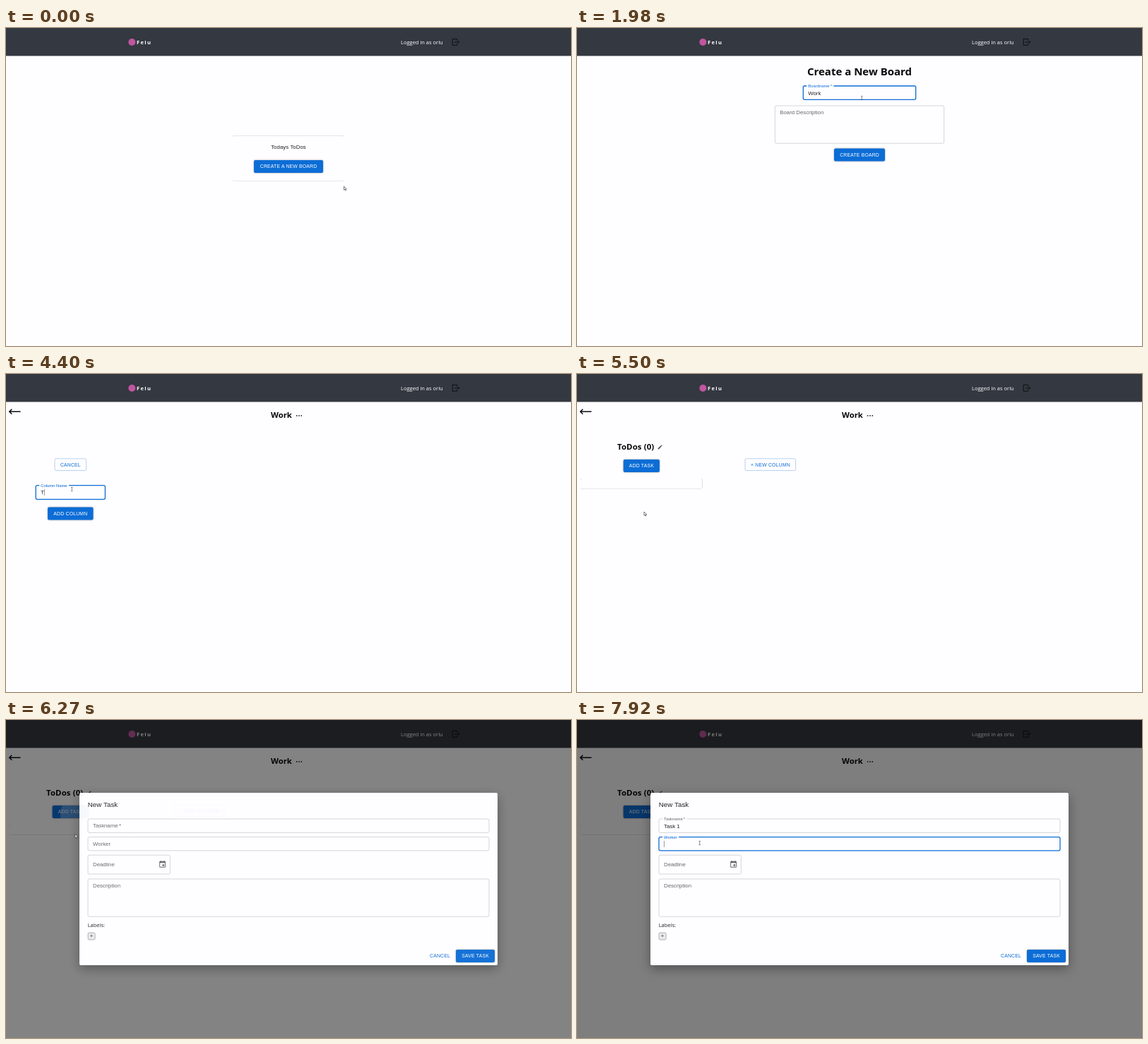
An HTML page for the animation above (8 s loop, 800 px wide and 450 px high).

```html
<!DOCTYPE html>
<html lang="en">
<head>
<meta charset="utf-8">
<title>Board demo</title>
<style>
  html, body { margin: 0; width: 100%; height: 100%; overflow: hidden; background: #fefdff; }
  #stage { display: block; width: 800px; height: 450px; }
  text { font: 7.8px "Liberation Sans", Arial, sans-serif; fill: #222; white-space: pre; }
  .ui { font: 7.5px "Open Sans", "Noto Sans", sans-serif; }
  .bold { font-weight: 700; fill: #080808; }
  .mid { text-anchor: middle; }
  .cap { font-size: 6.85px; letter-spacing: .0286em; text-anchor: middle; fill: #fff; }
  .blue { fill: #0c6dd6; }
  .paper { fill: #fefdff; filter: drop-shadow(0 .7px .6px rgba(0, 0, 0, .5)); }
  .btn .face { fill: #0c6dd6; filter: drop-shadow(0 .9px .8px rgba(0, 0, 0, .38)); }
  .btn.hover .face { fill: #1260bd; filter: drop-shadow(0 1.2px 1.5px rgba(0, 0, 0, .5)); }
  .ripple { fill: #fff; opacity: 0; }
  .outline { fill: #fefdff; stroke: #86b6ea; stroke-width: .6; }
  .frame { fill: none; stroke: #c4c3c6; stroke-width: .7; }
  .label { fill: #666; }
  .focus .frame { stroke: #0c6dd6; stroke-width: 1.3; }
  .focus .label { fill: #0c6dd6; }
  .notch { fill: #fefdff; }
  .caret { stroke: #333; stroke-width: .5; }
  .line { fill: none; stroke: #0b0c0e; }
  #sheet { fill: #fefdff; filter: drop-shadow(0 5px 8px rgba(0, 0, 0, .35)); }
  #cursor path { fill: #fff; stroke: #222; stroke-width: .6; stroke-linejoin: round; }
  #cursor #beam { fill: none; stroke: #444; }
</style>
</head>
<body>
<svg id="stage" viewBox="0 0 800 450"></svg>
<script>
const LOOP = 8000, STEP = 110;
const $ = id => document.getElementById(id);
const clamp = v => Math.max(0, Math.min(1, v));

// Markup helpers
const text = (x, y, s, cls = '', style = '') =>
  `<text x="${x}" y="${y}" class="${cls}" style="${style}">${s}</text>`;
const rect = (x, y, w, h, cls, rx = 2) =>
  `<rect x="${x}" y="${y}" width="${w}" height="${h}" rx="${rx}" class="${cls}"/>`;
const group = (id, body, attrs = '') => `<g id="${id}" ${attrs}>${body}</g>`;
const ripple = (x, y, w, h, style = '') =>
  `<svg x="${x}" y="${y}" width="${w}" height="${h}" viewBox="${x} ${y} ${w} ${h}"><circle class="ripple" style="${style}"/></svg>`;

const button = (id, x, y, w, label) => group(id,
  rect(x, y, w, 18, 'face') + ripple(x, y, w, 18) +
  text(x + w / 2 + .1, y + 11.3, label, 'cap'), 'class="btn"');

const outlined = (x, w, label) =>
  rect(x, 119.8, w, 16.8, 'outline') + text(x + w / 2 + .1, 130.7, label, 'cap blue');

const field = (id, x, y, w, h, label, rest = 12.3) => group(id,
  rect(x, y, w, h, 'frame') +
  `<rect class="notch" x="${x + 5}" y="${y - 1}" height="2" width="0"/>` +
  `<text class="label" data-x="${x + 7}" data-y="${y}" data-rest="${rest}">${label}</text>` +
  text(x + 7, y + 12.7, '', 'value') +
  `<line class="caret" y1="${y + 5.3}" y2="${y + 14.3}"/>`);

const home = (id, top, row) => {
  const extra = row ? 21 : 0;
  return group(id,
    rect(321, top, 158, 64 + extra, 'paper') +
    text(400, top + 18.4, 'Todays ToDos', 'mid', 'letter-spacing:.07px') +
    (row ? group('row', rect(321, 168, 158, 21, '', 0), 'fill="#f2f3f4"') +
      group('rowPress', ripple(321, 168, 158, 21, 'fill:#000')) +
      text(400, 181.2, 'Work', 'mid') : '') +
    button(id + 'Btn', 351, top + 34.7 + extra, 98, 'CREATE A NEW BOARD'));
};

const header =
  rect(0, 0, 800, 39.5, '', 0).replace('/>', ' fill="#343840"/>') +
  '<circle cx="178.3" cy="20" r="5" fill="#c0569f"/>' +
  text(185, 23.2, 'Felu', 'ui bold', 'fill:#fff;letter-spacing:1.4px') +
  text(559, 23, 'Logged in as orlu', 'ui', 'fill:#fff') +
  '<path class="line" stroke-width=".9" d="M638.6 17.6V15.5h-6.4v8.8h6.4v-2.1M635 19.9h6.6M639.8 18l2 1.9-2 1.9"/>';

const create = group('create',
  text(400, 67, 'Create a New Board', 'ui bold mid', 'font-size:15px') +
  field('boardname', 320.3, 82, 159.4, 19.3, 'Boardname\u2009*') +
  field('boardText', 280.3, 110, 239.4, 53.2, 'Board Description') +
  button('createBtn', 364, 170.4, 72, 'CREATE BOARD'));

const board = group('board',
  '<path class="line" stroke-width="1.5" d="M20.5 53.3H5M8.3 49.8L4.8 53.3l3.5 3.5"/>' +
  text(375, 62.4, 'Work', 'ui bold', 'font-size:11.3px') +
  [411.7, 415, 418.3].map(x => `<circle cx="${x}" cy="59" r=".9" fill="#333"/>`).join('') +
  group('firstColumn', outlined(55.4, 72, '+ NEW COLUMN')) +
  group('form',
    outlined(69, 44.6, 'CANCEL') +
    field('columnName', 42.2, 157.7, 98.2, 19.6, 'Column Name') +
    button('columnBtn', 59, 188.6, 64.5, 'ADD COLUMN')) +
  group('column',
    text(57, 106.9, 'ToDos (0)', 'ui bold', 'font-size:11.4px;letter-spacing:.12px') +
    '<path transform="translate(113.6 99.5) scale(.33)" fill="#555" d="M3 17.25V21h3.75L17.81 9.94l-3.75-3.75zM20.71 7.04c.39-.39.39-1.02 0-1.41l-2.34-2.34c-.39-.39-1.02-.39-1.41 0l-1.83 1.83 3.75 3.75z"/>' +
    rect(5, 148, 172.5, 14.3, 'paper') +
    button('taskBtn', 65.7, 121, 51.2, 'ADD TASK') +
    outlined(238, 71.6, '+ NEW COLUMN')));

const dialog = group('dialog',
  '<rect width="800" height="450" opacity=".5"/>' +
  '<rect id="sheet" x="104" y="103" width="592" height="244" rx="2"/>' +
  text(115.7, 122.5, 'New Task', '', 'font-size:9.74px;letter-spacing:.07px') +
  field('taskname', 116, 140, 568, 19.4, 'Taskname\u2009*') +
  field('worker', 116, 165.6, 568, 19.2, 'Worker') +
  field('deadline', 116, 191.2, 116.3, 26.8, 'Deadline', 16) +
  '<path transform="translate(215.7 198.4) scale(.487)" fill="#666" d="M17 12h-5v5h5zM16 1v2H8V1H6v2H5a2 2 0 0 0-2 2v14a2 2 0 0 0 2 2h14a2 2 0 0 0 2-2V5a2 2 0 0 0-2-2h-1V1zm3 18H5V8h14z"/>' +
  field('details', 116, 225, 568, 53.2, 'Description') +
  text(115.7, 292.6, 'Labels:', 'ui') +
  '<rect x="116.1" y="301" width="10" height="10" rx="1.6" fill="#e9e9ec" stroke="#858588" stroke-width=".6"/>' +
  text(121.1, 308.4, '+', 'mid', 'font-size:6.8px') +
  text(614.5, 336.3, 'CANCEL', 'cap blue') +
  button('saveBtn', 637, 325, 55, 'SAVE TASK'));

const cursor = group('cursor',
  '<path id="arrow" d="M0 0v5.2l1.2-1 .8 1.8 .9-.4-.8-1.7h1.6z"/>' +
  '<path id="hand" d="M-.7 4.2V.6q.7-1 1.3 0v2.3l2.3.6q.6.3.5 1l-.5 2.7h-3.4l-2-2.6q.2-1 1.1-.4z"/>' +
  '<path id="beam" d="M-1.3-2.6h1l.3.3.3-.3h1M0-2.4v4.8M-1.3 2.6h1l.3-.3.3.3h1"/>');

$('stage').innerHTML = header + home('empty', 152.2) + home('listed', 141.7, true) +
  create + board + dialog + cursor;

// Timeline: [id, from, to]
const shown = [
  ['empty', 0, 660], ['create', 660, 2750], ['listed', 2750, 3300], ['board', 3300, LOOP],
  ['row', 2750, 3300], ['firstColumn', 3300, 3850], ['form', 3850, 5500],
  ['column', 5500, LOOP], ['dialog', 6270, LOOP]
];
const hovers = [
  ['emptyBtn', 330, 660], ['createBtn', 880, 990], ['createBtn', 2530, 2750],
  ['columnBtn', 5170, 5500], ['taskBtn', 5940, 6270]
];
// [id, x, y, start]
const presses = [
  ['emptyBtn', 419, 192, 440], ['createBtn', 400, 181, 2530], ['rowPress', 399, 184, 3080],
  ['columnBtn', 95, 196, 5280], ['taskBtn', 101, 133, 6050]
];
const inputs = [
  { id: 'boardname', focus: [770, 2750], caret: [880, 1980], value: 'Work', keys: [1210, 1430, 1650, 1870] },
  { id: 'columnName', focus: [4070, 5500], caret: [4290, 5060], value: 'ToDos', keys: [4290, 4510, 4620, 4840, 4950] },
  { id: 'taskname', focus: [6710, 7700], caret: [6710, 7590], value: 'Task 1', keys: [6930, 7040, 7150, 7260, 7370, 7480] },
  { id: 'worker', focus: [7700, LOOP], caret: [7810, LOOP], value: '', keys: [] }
];
// Pointer: time, x, y, shape
const track = [
  [0, 478.5, 224, 'arrow'], [330, 428, 194, 'hand'], [440, 419, 190, 'hand'], [660, 419, 190, 'arrow'],
  [880, 417, 177, 'hand'], [990, 411, 140, 'arrow'], [1100, 403.3, 99, 'beam'], [2200, 403.3, 99, 'beam'],
  [2310, 402, 112, 'arrow'], [2530, 400, 180, 'hand'], [2750, 400, 182, 'hand'], [2970, 398.7, 184, 'hand'],
  [3190, 398.7, 184, 'hand'], [3300, 385, 179, 'arrow'], [3630, 112, 132, 'hand'], [3740, 94, 128, 'hand'],
  [3960, 93, 130, 'hand'], [4070, 93.3, 163, 'beam'], [4950, 93.3, 163, 'beam'], [5060, 94, 181, 'arrow'],
  [5170, 95, 195, 'hand'], [5500, 95, 195, 'arrow'], [5720, 97, 180, 'arrow'], [5940, 101, 137, 'hand'],
  [6050, 101, 134, 'hand'], [6160, 101, 140, 'hand'], [6270, 98, 161.5, 'arrow'], [6380, 102, 160, 'arrow'],
  [6600, 158, 150, 'beam'], [6710, 170, 149, 'beam'], [7480, 170, 149, 'beam'], [7700, 173.7, 174, 'beam'],
  [LOOP, 173.7, 174, 'beam']
];

const within = (t, [from, to]) => t >= from && t < to;
const fields = [...document.querySelectorAll('.label')].map(label => label.parentNode);

function drawField(node, t) {
  const input = inputs.find(i => i.id === node.id);
  const part = name => node.querySelector('.' + name);
  const label = part('label'), value = part('value'), caret = part('caret');
  const { x, y, rest } = label.dataset;
  const p = input ? 1 - (1 - clamp((t - input.focus[0]) / 200)) ** 3 : 0;
  const size = 1 - .25 * p;
  label.setAttribute('transform', `translate(${x} ${+y + rest * (1 - p) + 2 * p}) scale(${size})`);
  part('notch').setAttribute('width', p && p * (label.getComputedTextLength() * .75 + 4.5));
  node.classList.toggle('focus', !!input && within(t, input.focus));
  value.textContent = input ? input.value.slice(0, input.keys.filter(k => t >= k).length) : '';
  const end = +x + .4 + (value.textContent ? value.getComputedTextLength() : 0);
  caret.setAttribute('x1', end);
  caret.setAttribute('x2', end);
  caret.style.display = input && within(t, input.caret) ? '' : 'none';
}

function drawRipple([id, x, y, start], t) {
  const dt = t - start, c = $(id).querySelector('.ripple');
  const live = dt > 0 && dt < 500;
  const peak = id === 'rowPress' ? .1 : .3;
  if (!live) return;
  c.setAttribute('cx', x);
  c.setAttribute('cy', y);
  c.setAttribute('r', dt * .11);
  c.style.opacity = peak * (1 - clamp((dt - 200) / 300));
}

function drawCursor(t) {
  const i = track.findLastIndex(k => k[0] <= t);
  const [t0, x0, y0, shape] = track[i], [t1, x1, y1] = track[i + 1];
  const p = (t - t0) / (t1 - t0);
  $('cursor').setAttribute('transform', `translate(${x0 + (x1 - x0) * p} ${y0 + (y1 - y0) * p})`);
  for (const id of ['arrow', 'hand', 'beam']) $(id).style.display = id === shape ? '' : 'none';
}

function draw(t) {
  for (const [id, ...span] of shown) $(id).style.display = within(t, span) ? '' : 'none';
  document.querySelectorAll('.btn').forEach(b => b.classList.toggle('hover',
    hovers.some(([id, ...span]) => id === b.id && within(t, span))));
  document.querySelectorAll('.ripple').forEach(c => c.style.opacity = 0);
  presses.forEach(press => drawRipple(press, t));
  $('row').style.opacity = clamp((t - 2640) / 220);
  $('dialog').style.opacity = t < 6380 ? .96 : 1;
  fields.forEach(node => drawField(node, t));
  drawCursor(t);
}

const start = performance.now();
function tick() {
  const t = (performance.now() - start) % LOOP;
  draw(Math.floor(t / STEP) * STEP);
  requestAnimationFrame(tick);
}
tick();
</script>
</body>
</html>
```
